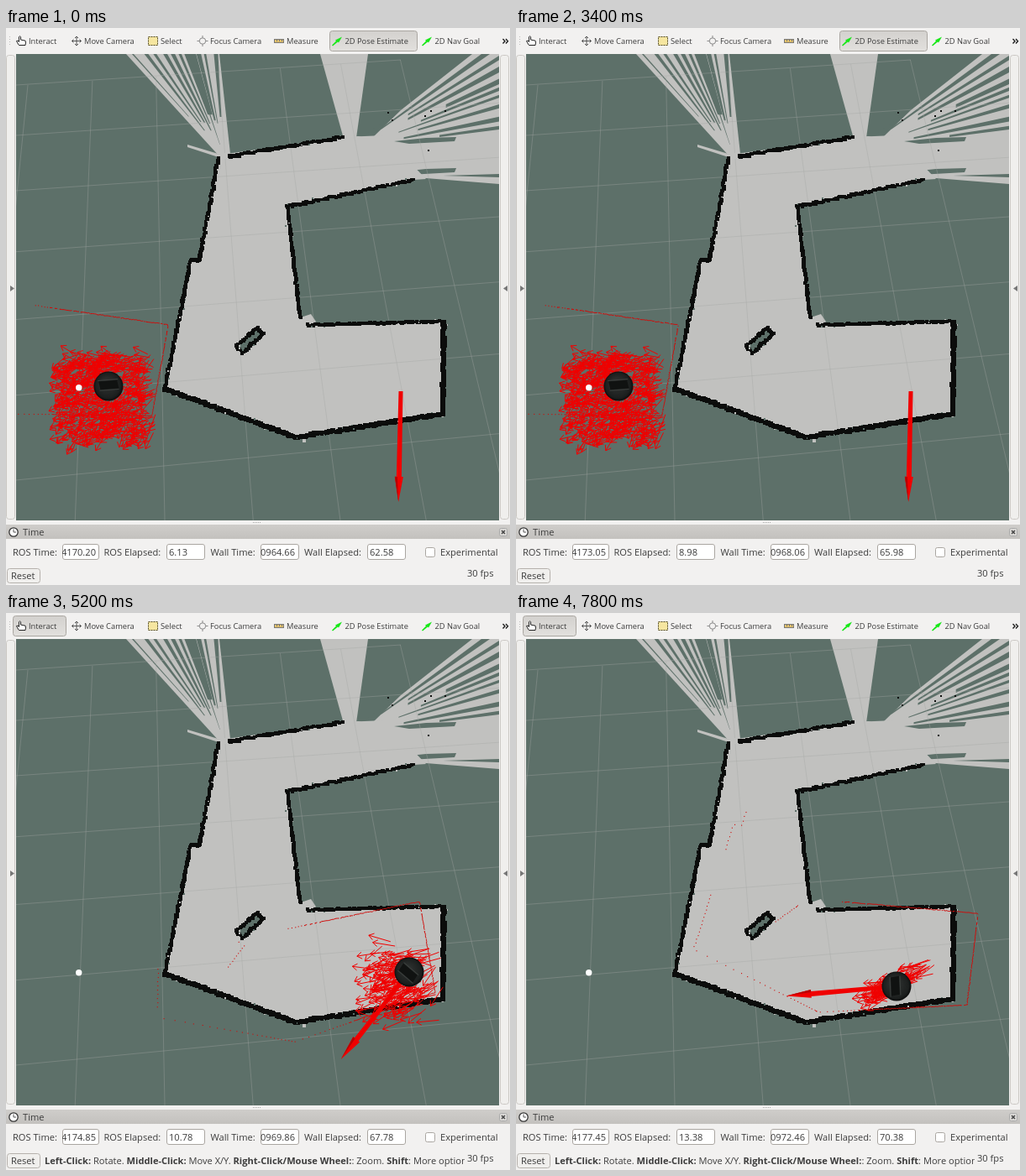
These frames come from a looping animation (600 by 664 pixels, 8000 ms). An HTML page with a canvas:

```html
<!DOCTYPE html>
<html lang="en">
<head>
<meta charset="utf-8">
<title>Localization view</title>
<style>
  html, body { margin: 0; width: 100%; height: 100%; overflow: hidden; background: #f2f1f0; }
  canvas, svg { position: absolute; left: 0; top: 0; width: 600px; height: 664px; }
  text { font: 11.1px "Open Sans", "Noto Sans", sans-serif; fill: #3c3c3c; white-space: pre; }
  .tool { font-size: 9.3px; }
  .b { font-weight: 700; }
  .line { fill: none; stroke: #555; }
</style>
</head>
<body>
<canvas id="scene" width="600" height="664"></canvas>
<svg viewBox="0 0 600 664">
  <defs>
    <linearGradient id="pressed" x2="0" y2="1"><stop stop-color="#d3d1ce"/><stop offset="1" stop-color="#e2e0dd"/></linearGradient>
    <linearGradient id="bar" x2="0" y2="1"><stop stop-color="#cfcdca"/><stop offset="1" stop-color="#c3c1be"/></linearGradient>
    <clipPath id="statusClip"><rect x="44" y="640" width="502" height="24"/></clipPath>
    <path id="goal" d="M-6 5L-1 0L-2-1L6-5L2 2L1 1L-5 6Z" fill="#18e818"/>
  </defs>
  <path d="M0 0H600V664H0ZM12 31V587H587V31Z" fill="#f2f1f0" fill-rule="evenodd"/>
  <g fill="#f0efed" stroke="#cbc8c4">
    <rect x=".5" y="32.5" width="10" height="553" rx="3"/>
    <rect x="588.5" y="32.5" width="10" height="553" rx="3"/>
  </g>
  <path d="M5 307L10 310.5L5 314ZM597 307L592 310.5L597 314Z" fill="#777"/>
  <path d="M294 589.5H304" stroke="#aaa" stroke-dasharray="1 1"/>

  <rect id="active" y="3.5" height="24" rx="3" fill="url(#pressed)" stroke="#aaa6a1"/>
  <path d="M4.5 10V22" stroke="#bbb" stroke-dasharray="1 2"/>
  <path d="M15 20L12.500 15.500L14 15L15.500 16.500V10.500Q16.500 9 17.500 10.500V14L23 15.200Q24 16 23 20.500H15.500Z" fill="#fff" stroke="#222"/>
  <g class="line">
    <path d="M78.500 15.500H89.500M84 10V21M80.500 13.500L78.500 15.500L80.500 17.500M87.500 13.500L89.500 15.500L87.500 17.500M82 12L84 10L86 12M82 19L84 21L86 19"/>
    <path d="M227.500 15.500H240.500M234 9V22" stroke="#888"/>
    <circle cx="234" cy="15.500" r="3.700" fill="#f2f1f0" stroke="#888"/>
  </g>
  <rect x="169.5" y="10.5" width="11" height="10" fill="#f6e6a0" stroke="#554c20" stroke-dasharray="2 1"/>
  <rect x="319.5" y="13.5" width="11" height="4" fill="#e5c36c" stroke="#777"/>
  <path d="M322.500 13V16M325.500 13V16M328.500 13V16" stroke="#777"/>
  <use href="#goal" x="394" y="15.5"/><use href="#goal" x="501" y="15.5"/>
  <g id="tools"></g>
  <path d="M591.500 13L594 15.700L591.500 18.400M595 13L597.500 15.700L595 18.400" fill="none" stroke="#222" stroke-width="1.4"/>

  <rect y="592" width="600" height="17" fill="url(#bar)"/>
  <circle cx="9" cy="601" r="5.2" fill="#fff" stroke="#333" stroke-width="1.3"/>
  <path d="M9 597.500V601H12" class="line"/>
  <text x="20" y="605">Time</text>
  <rect x="587.5" y="596.5" width="9" height="9" rx="2" fill="#dddbd8" stroke="#aaa"/>
  <path d="M590 599L594 603M594 599L590 603" stroke="#444" stroke-width="1.5"/>
  <g id="fields"></g>
  <rect x="499.5" y="619.5" width="11" height="11" rx="2" fill="#fff" stroke="#aaa6a1"/>
  <text x="517" y="629">Experimental</text>

  <rect x="1.5" y="644.5" width="39" height="17" rx="3" fill="#f0efed" stroke="#b5b1ac"/>
  <text x="6" y="657">Reset</text>
  <g id="status" clip-path="url(#statusClip)">
    <text x="46" y="657"><tspan class="b">Left-Click:</tspan> Rotate. <tspan class="b">Middle-Click:</tspan> Move X/Y. <tspan class="b">Right-Click/Mouse Wheel:</tspan>: Zoom. <tspan class="b">Shift</tspan>: More options.</text>
  </g>
  <text x="549" y="654">30 fps</text>
</svg>
<script>
const STEP = 200, LOOP = 8000, TAU = Math.PI * 2;
const PRESS = 4400, RELEASE = 5200, LAST = 7800;
const $ = id => document.getElementById(id);
const ctx = $('scene').getContext('2d');
const red = '#f00000', ground = '#5d7069', free = '#c1c1bf', black = '#0b0c0b';
const lerp = (a, b, k) => a + (b - a) * k;

function rng(seed) {
  return () => {
    seed = seed + 0x6D2B79F5 | 0;
    let a = Math.imul(seed ^ seed >>> 15, 1 | seed);
    a = a + Math.imul(a ^ a >>> 7, 61 | a) ^ a;
    return ((a ^ a >>> 14) >>> 0) / 4294967296;
  };
}

// Corners of the walls, shared by the map and the laser
const walls = [
  [[264, 153], [402, 130]],
  [[253, 154], [230, 277], [220, 277], [189, 430], [345, 488], [520, 460], [521, 350], [358, 354]],
  [[350, 345], [335, 213], [485, 181]],
  [[274, 379], [299, 358], [307, 364], [281, 388], [274, 379]]
];
const edges = walls.flatMap(w => w.slice(1).map((end, i) => [w[i], end]));

// Interface text
$('tools').innerHTML = [[27, 'Interact'], [93, 'Move Camera'], [184, 'Select'], [243, 'Focus Camera'],
  [334, 'Measure'], [403.5, '2D Pose Estimate'], [510.5, '2D Nav Goal']]
  .map(([x, s]) => `<text class="tool" x="${x}" y="19">${s}</text>`).join('');

$('fields').innerHTML = [[8, 'ROS Time:', 67, -1], [116.5, 'ROS Elapsed:', 191, 3],
  [243.5, 'Wall Time:', 303, 0], [355, 'Wall Elapsed:', 430, 3]]
  .map(([x, label, box, pad], i) => `<text x="${x}" y="629">${label}</text>
    <svg x="${box}" y="615" width="${i ? 46 : 44}" height="19">
      <rect x=".5" y=".5" width="${i ? 45 : 43}" height="18" rx="2.5" fill="#fff" stroke="#aaa6a1"/>
      <text id="value${i}" x="${pad}" y="14"></text></svg>`).join('');
document.querySelectorAll('svg svg').forEach(s => {
  s.style.cssText = 'position:static';
  s.style.width = s.getAttribute('width') + 'px';
  s.style.height = '19px';
});

// Drawing helpers
function poly(g, color, ...p) {
  g.fillStyle = color;
  g.beginPath();
  for (let i = 0; i < p.length; i += 2) g.lineTo(p[i], p[i + 1]);
  g.fill();
}
function line(g, x1, y1, x2, y2) {
  g.beginPath();
  g.moveTo(x1, y1);
  g.lineTo(x2, y2);
  g.stroke();
}
function disc(g, x, y, r, color) {
  g.fillStyle = color;
  g.beginPath();
  g.arc(x, y, r, 0, TAU);
  g.fill();
}
function block(g, color, x, y, size) {
  g.fillStyle = color;
  g.fillRect(Math.round(x - size / 2), Math.round(y - size / 2), Math.round(size), Math.round(size));
}
function particle(path, x, y, angle, len) {
  const tx = x + Math.cos(angle) * len, ty = y + Math.sin(angle) * len;
  const barb = d => [tx - Math.cos(angle + d) * 7, ty - Math.sin(angle + d) * 7];
  path.moveTo(x, y);
  path.lineTo(tx, ty);
  path.moveTo(...barb(.6));
  path.lineTo(tx, ty);
  path.lineTo(...barb(-.6));
}

function drawFans(g, rnd) {
  // A dark sliver that narrows from the border toward the apex
  const sliver = (ax, ay, x1, y1, x2, y2, k) =>
    poly(g, ground, x1, y1, x2, y2, lerp(x2, ax, k), lerp(y2, ay, k), lerp(x1, ax, k), lerp(y1, ay, k));

  poly(g, free, 143, 31, 254, 31, 267, 150, 254, 153);
  for (let x = 149; x < 252; x += 8 + rnd() * 7) sliver(259, 152, x, 30, x + 2 + rnd() * 4, 30, .6 + rnd() * .3);
  sliver(259, 152, 212, 30, 226, 30, .6);
  poly(g, free, 216, 139, 256, 151, 256, 155, 216, 142);

  poly(g, free, 374, 31, 431, 31, 417, 131, 402, 132);

  poly(g, free, 402, 131, 419, 129, 436, 131, 470, 98, 555, 31, 587, 31, 587, 186, 500, 179, 400, 175);
  poly(g, ground, 419, 128, 446, 104, 476, 88, 460, 104, 424, 130);
  for (let y = 33; y < 118; y += 9 + rnd() * 6) sliver(415, 143, 587, y, 587, y + 3 + rnd() * 4, .35 + rnd() * .45);
  sliver(415, 143, 566, 31, 576, 31, .8);
  for (const y of [133, 170]) poly(g, ground, 462, y + 2, 500, y - 2, 536, y - 3, 534, y + 2, 480, y + 5);
  poly(g, ground, 520, 176, 587, 174, 587, 178);
}

function drawGrid(g) {
  g.strokeStyle = '#a2a7a4';
  g.lineWidth = 1;
  g.globalAlpha = .38;
  const depth = (j, a, b) => a * j / (1 - b * j);
  for (let i = 0; i < 7; i++) {
    line(g, 26 + 77.5 * i - .6 * i * i, 68 - 5 * i, -26 + 109 * i - .75 * i * i, 587);
    line(g, 12, 68 + depth(i, 57.3, .045), i ? 587 : 470, (i ? 30 : 38) + depth(i, 57, .041));
  }
  g.globalAlpha = 1;
}

function makeMap() {
  const map = document.createElement('canvas');
  map.width = 600; map.height = 664;
  const g = map.getContext('2d'), rnd = rng(7);
  g.fillStyle = ground;
  g.fillRect(12, 31, 575, 556);
  drawFans(g, rnd);
  const floor = [[256, 151], [403, 130], [450, 128], [500, 180], ...walls[2].slice().reverse(), ...walls[1].slice().reverse()];
  poly(g, free, ...floor.flat());
  poly(g, free, 348, 346, 363, 341, 369, 350, 358, 358);
  poly(g, ground, ...walls[3].flat());
  drawGrid(g);

  for (const [[x1, y1], [x2, y2]] of edges) {
    const n = Math.hypot(x2 - x1, y2 - y1) / 1.8, thick = y1 > 420 ? 5.5 : 4;
    for (let i = 0; i <= n; i++) {
      const x = lerp(x1, x2, i / n) + (rnd() - .5) * 1.8, y = lerp(y1, y2, i / n) + (rnd() - .5) * 1.8;
      if (rnd() < .15) block(g, rnd() < .5 ? free : ground, x + (rnd() - .5) * 8, y + (rnd() - .5) * 8, 2);
      block(g, black, x, y, thick - .8 + rnd() * 1.6);
    }
  }
  for (let i = 0; i < 6; i++) block(g, black, 445 + rnd() * 95, 92 + rnd() * 60, 2);
  block(g, free, 260, 152, 7);
  block(g, free, 355, 492, 4);
  return map;
}

function makeCloud() {
  const path = new Path2D(), rnd = rng(21);
  for (let i = 0; i < 560; i++)
    particle(path, 70 + rnd() * 108, 388 + rnd() * 104, 2.8 + (rnd() + rnd() - 1) * 1.1, 16 + rnd() * 6);
  return path;
}

const map = makeMap(), firstCloud = makeCloud();
const rnd = rng(5), spreadOut = () => rnd() + rnd() - 1;
const swarm = Array.from({ length: 160 }, () => [spreadOut(), spreadOut(), spreadOut()]);

// Distance from (x, y) to the nearest wall in the given direction
function castRay(x, y, angle) {
  const c = Math.cos(angle), s = Math.sin(angle);
  let best = Infinity;
  for (const [[x1, y1], [x2, y2]] of edges) {
    const ex = x2 - x1, ey = y2 - y1, cross = c * ey - s * ex;
    const dist = ((x1 - x) * ey - (y1 - y) * ex) / cross;
    const along = ((x1 - x) * s - (y1 - y) * c) / cross;
    if (dist > 0 && along >= 0 && along <= 1) best = Math.min(best, dist);
  }
  return best;
}

// Laser hits measured at the true pose, drawn around the believed pose
function drawScan(t, trueX, trueY, x, y, error) {
  const noise = rng(t + 3);
  let lastX = 0, lastY = 0;
  ctx.strokeStyle = ctx.fillStyle = '#d00c0a';
  ctx.lineWidth = 1;
  for (let deg = 0; deg < 360; deg++) {
    const angle = deg * TAU / 360, dist = castRay(trueX, trueY, angle) + noise() - .5;
    if (dist > 290) continue;
    const hx = x + Math.cos(angle + error) * dist, hy = y + Math.sin(angle + error) * dist;
    const gap = Math.hypot(hx - lastX, hy - lastY);
    if (gap < 3 && noise() < .85) line(ctx, lastX, lastY, hx, hy);
    else ctx.fillRect(hx - .5, hy - .5, 1.1, 1.1);
    lastX = hx;
    lastY = hy;
  }
}

function drawRobot(x, y, heading) {
  ctx.save();
  ctx.translate(x, y);
  const shade = ctx.createRadialGradient(-3, -4, 2, 0, 0, 18);
  shade.addColorStop(0, '#303332');
  shade.addColorStop(.8, '#1c1f1e');
  shade.addColorStop(1, '#080909');
  disc(ctx, 0, 0, 17.5, shade);
  ctx.rotate(heading);
  poly(ctx, '#101211', -11, -7, 11, -6, 12, 4, -10, 3);
  ctx.strokeStyle = '#3c403e';
  ctx.lineWidth = 1;
  line(ctx, -12, -8, 12, -7);
  line(ctx, -11, 4, 12, 5);
  ctx.restore();
}

function drawArrow(x, y, angle) {
  const len = 132, neck = len - 30;
  ctx.save();
  ctx.translate(x, y);
  ctx.rotate(angle);
  poly(ctx, red, 0, -2.5, neck, -3, neck, -5, len, 0, neck, 5, neck, 3, 0, 2.5);
  poly(ctx, '#b90000', neck, 2, len, 0, neck, 5);
  ctx.restore();
}

function drawDragArrow(t) {
  ctx.save();
  ctx.translate(466.5, 435);
  ctx.rotate(Math.min(2.09, 1.58 + (t - PRESS) * .00125));
  poly(ctx, '#0dff0a', 0, -10, 240, -13, 240, 13, 0, 10);
  ctx.scale(.4, 1);
  disc(ctx, 0, 0, 10, '#0cf00a');
  ctx.restore();
}

function drawSwarm(cx, cy, p) {
  const path = new Path2D(), tilt = lerp(-.05, -.55, p), c = Math.cos(tilt), s = Math.sin(tilt);
  for (const [u, v, w] of swarm.slice(0, lerp(160, 105, p))) {
    const a = u * 48, b = v * lerp(52, 11, p);
    particle(path, cx + a * c - b * s, cy + a * s + b * c, 2.8 + w * lerp(.8, .4, p), 27);
  }
  ctx.strokeStyle = red;
  ctx.lineWidth = 1;
  ctx.stroke(path);
}

function drawBefore(t) {
  drawScan(t, 470, 433, 129, 427, .17);
  ctx.strokeStyle = red;
  ctx.lineWidth = 1;
  ctx.stroke(firstCloud);
  drawRobot(122, 427, -.12);
  if (t < PRESS) drawArrow(470, 433, 1.592);
  else drawDragArrow(t);
}

// The robot turns on the spot while the particles close in
function drawAfter(t) {
  const p = (t - RELEASE) / (LAST - RELEASE);
  const x = 480 - 27 * p ** 3.5, y = 428 + 17 * p * p, heading = (128 + 47 * p) * TAU / 360;
  drawScan(t, x, y, x - 14 + 33 * p, y, .18 * Math.sin(4 * (p - .38)));
  drawSwarm(x + 10 * p, y + 12 - 18 * p, p);
  drawArrow(x, y, heading);
  drawRobot(x, y, heading + Math.PI / 2);
}

function draw(t) {
  const moved = t >= RELEASE, sec = t / 1000;
  ctx.save();
  ctx.beginPath();
  ctx.rect(12, 31, 575, 556);
  ctx.clip();
  ctx.drawImage(map, 0, 0);
  if (moved) drawAfter(t);
  else drawBefore(t);
  disc(ctx, 86.7, 428.8, 3.7, '#fff');
  ctx.restore();

  $('active').setAttribute('x', moved ? 8.5 : 385.5);
  $('active').setAttribute('width', moved ? 63 : 104);
  $('status').style.display = moved ? '' : 'none';

  const ros = Math.max(6.13, 5.576 + sec);
  [4164.07 + ros, ros, 964.66 + sec, 62.58 + sec].forEach((v, i) => {
    $('value' + i).textContent = (i === 2 ? '0' : '') + v.toFixed(2);
  });
}

const start = performance.now();
let shown = -1;
function tick() {
  const step = Math.floor((performance.now() - start) % LOOP / STEP);
  if (step !== shown) draw((shown = step) * STEP);
  requestAnimationFrame(tick);
}
tick();
</script>
</body>
</html>
```
